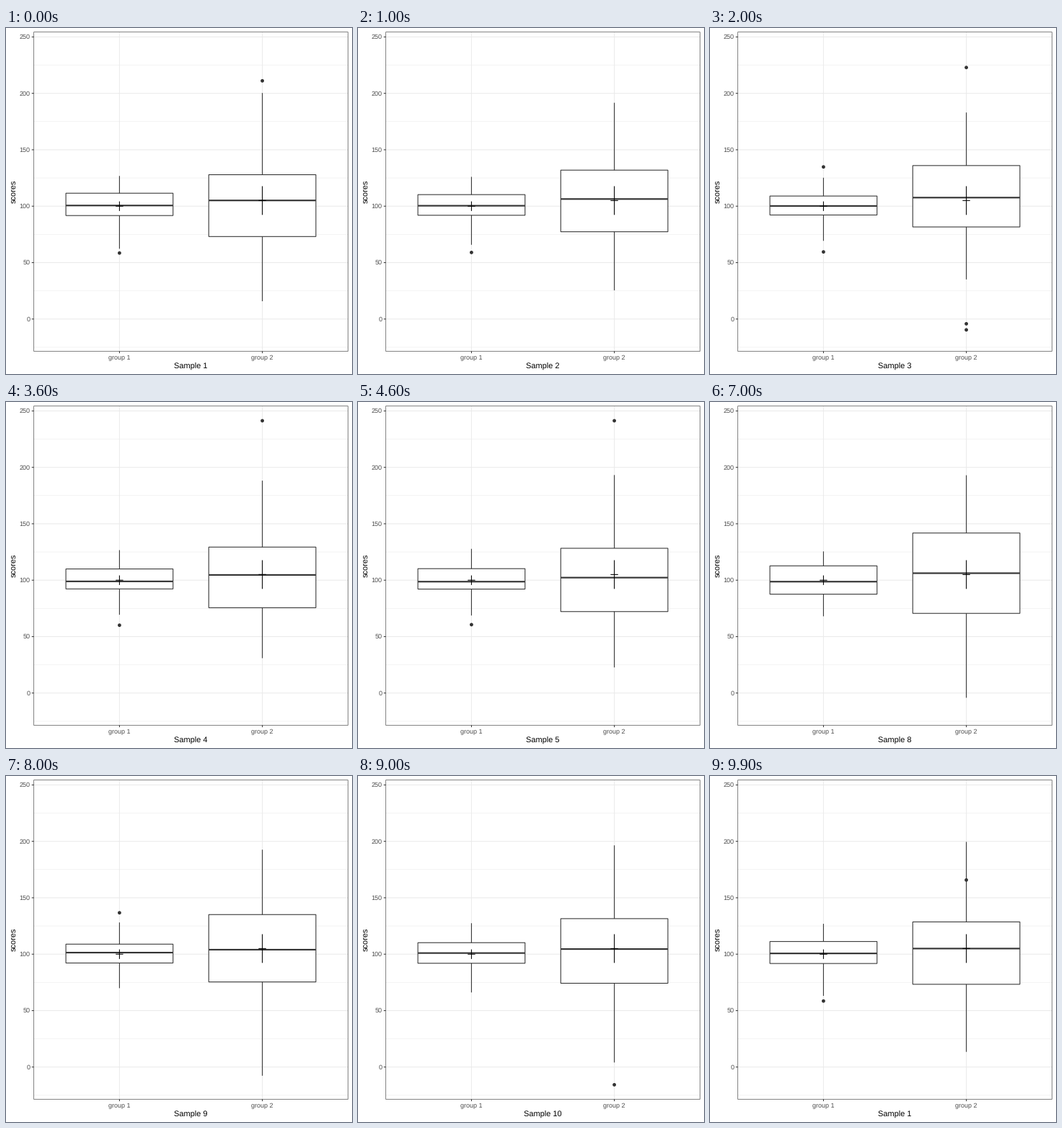
Write a matplotlib script that moves like this. It is 480x480 px and loops after 10000 ms.

```python
import numpy as np
import matplotlib.pyplot as plt
from matplotlib.animation import FuncAnimation
from matplotlib.patches import Circle, Rectangle

plt.rcParams.update({
    "font.family": "Liberation Sans",
    "path.snap": False,
    "text.hinting": "none",
    "lines.solid_capstyle": "butt",
})

SIZE, DPI = 480, 72                  # at 72 dpi one point is one pixel
LEFT, RIGHT, TOP, BOTTOM = 38.5, 474.5, 5.7, 448.4
UNIT = (RIGHT - LEFT) / 2.2          # distance between the two groups
INK, GRID, TICK_TEXT = "#333333", "#EBEBEB", "#4D4D4D"
LINE = 1.07

SAMPLES, STEPS, HOLD = 10, 10, 5     # steps per sample, steps at rest
GROUP_SIZE = 50

# Key samples; the ones between follow by periodic interpolation.
KEYS = (0, 2, 4, 5, 7, 8)
# Rows: low, q1, median, q3, high
NARROW = ((62.3, 69.3, 69.4, 65.9, 68.0, 69.9),
          (91.7, 92.2, 92.3, 91.4, 87.6, 92.2),
          (100.6, 100.2, 98.1, 101.1, 98.7, 101.4),
          (111.5, 109.0, 110.6, 108.7, 112.7, 108.9),
          (126.8, 125.2, 127.6, 128.4, 125.5, 128.1))
WIDE = ((15.8, 35.1, 28.1, 1.1, -4.2, -7.7),
        (73.1, 81.6, 71.6, 74.5, 70.6, 75.4),
        (105.1, 107.6, 102.7, 100.6, 106.2, 104.0),
        (127.9, 136.0, 124.9, 141.8, 141.8, 135.1),
        (200.3, 183.0, 191.7, 199.1, 193.0, 192.6))

# Outliers by sample: a slowly rising low one, plus a few single ones
NARROW_DOTS = {k: [58.5 + k / 2] for k in range(6)}
NARROW_DOTS[2].append(134.8)
NARROW_DOTS.update({6: [138], 8: [136.7]})
WIDE_DOTS = {0: [211.1], 2: [-9.6, -4.2, 222.9], 4: [241.3], 9: [-15.7]}


def to_y(score):
    return 403.75 - 1.5655 * np.asarray(score, dtype=float)


def resample(values, other):
    """Stretch values to the longer length; an empty list starts at the other's mean."""
    values = sorted(values) or [np.mean(other)]
    n = max(len(values), len(other))
    picks = np.linspace(0, len(values) - 1, n).round().astype(int)
    return np.take(values, picks)


def blend_outliers(a, b, t):
    if t == 0 or not (a or b):
        return a
    return (1 - t) * resample(a, b) + t * resample(b, a)


fig = plt.figure(figsize=(SIZE / DPI, SIZE / DPI), dpi=DPI, facecolor="white")
ax = fig.add_axes([0, 0, 1, 1])
ax.set_xlim(0, SIZE)
ax.set_ylim(SIZE, 0)
ax.axis("off")


def line(x, y, color=INK, lw=LINE, z=3):
    return ax.plot(x, y, color=color, lw=lw, zorder=z)[0]


def label(x, y, text, size, color, ha="center", **kw):
    return ax.text(x, y, text, size=size, color=color, ha=ha, va="baseline", **kw)


def center(i):
    return LEFT + (0.6 + i) * UNIT


def draw_panel():
    for score in range(-25, 250, 50):
        line((LEFT, RIGHT), [to_y(score)] * 2, GRID, LINE / 2, 1)
    for score in range(0, 251, 50):
        y = to_y(score)
        line((LEFT, RIGHT), (y, y), GRID, LINE, 1)
        line((LEFT - 2.75, LEFT), (y, y))
        label(33.5, y + 2.8, str(score), 9, TICK_TEXT, "right")
    for i in range(2):
        x = center(i)
        line((x, x), (TOP, BOTTOM), GRID, LINE, 1)
        line((x, x), (BOTTOM, BOTTOM + 2.75))
        label(x, 460, f"group {i + 1}", 9, TICK_TEXT)
    ax.add_patch(Rectangle((LEFT, TOP), RIGHT - LEFT, BOTTOM - TOP,
                           fill=False, ec=INK, lw=0.6, zorder=6))
    label(14.6, 227, "scores", 11, "black", rotation=90, rotation_mode="anchor")


class Box:
    def __init__(self, x, mean, sd, rows, outliers):
        self.rows, self.outliers = rows, outliers
        half = 0.375 * UNIT
        self.box = Rectangle((x - half, 0), 2 * half, 1, fc="white",
                             ec=INK, lw=LINE, joinstyle="miter", zorder=2)
        ax.add_patch(self.box)
        self.upper = line((x, x), (0, 0))
        self.lower = line((x, x), (0, 0))
        self.median = line((x - half, x + half), (0, 0), lw=2 * LINE)
        most = max(map(len, outliers.values()))
        self.dots = [ax.add_patch(Circle((x, 0), 2.4, fc=INK, lw=0, zorder=4))
                     for _ in range(most)]
        self.draw_mean(x, mean, 2 * sd / GROUP_SIZE ** 0.5)

    def draw_mean(self, x, mean, margin):
        y = to_y(mean)
        line((x, x), to_y([mean - margin, mean + margin]), "black", z=5)
        line((x - 5.2, x + 5.2), (y, y), "black", z=5)

    def update(self, k, t):
        low, q1, mid, q3, high = (to_y(np.interp(k + t, KEYS, row, period=SAMPLES))
                                  for row in self.rows)
        self.box.set_y(q3)
        self.box.set_height(q1 - q3)
        self.upper.set_ydata((high, q3))
        self.lower.set_ydata((q1, low))
        self.median.set_ydata((mid, mid))
        scores = blend_outliers(self.outliers.get(k, []),
                                self.outliers.get((k + 1) % SAMPLES, []), t)
        for i, dot in enumerate(self.dots):
            dot.set_visible(i < len(scores))
            if i < len(scores):
                dot.center = dot.center[0], to_y(scores[i])


draw_panel()
boxes = [Box(center(0), 100, 15, NARROW, NARROW_DOTS),
         Box(center(1), 105, 45, WIDE, WIDE_DOTS)]
title = label((LEFT + RIGHT) / 2, 473, "", 11, "black")


def update(frame):
    k, step = divmod(frame, STEPS)
    t = max(0, step - HOLD) / (STEPS - HOLD)
    for box in boxes:
        box.update(k, t)
    title.set_text(f"Sample {round(k + t) % SAMPLES + 1}")
    return []


anim = FuncAnimation(fig, update, frames=STEPS * SAMPLES, interval=100,
                     init_func=lambda: update(0), repeat=True, repeat_delay=0)
plt.show()
```
